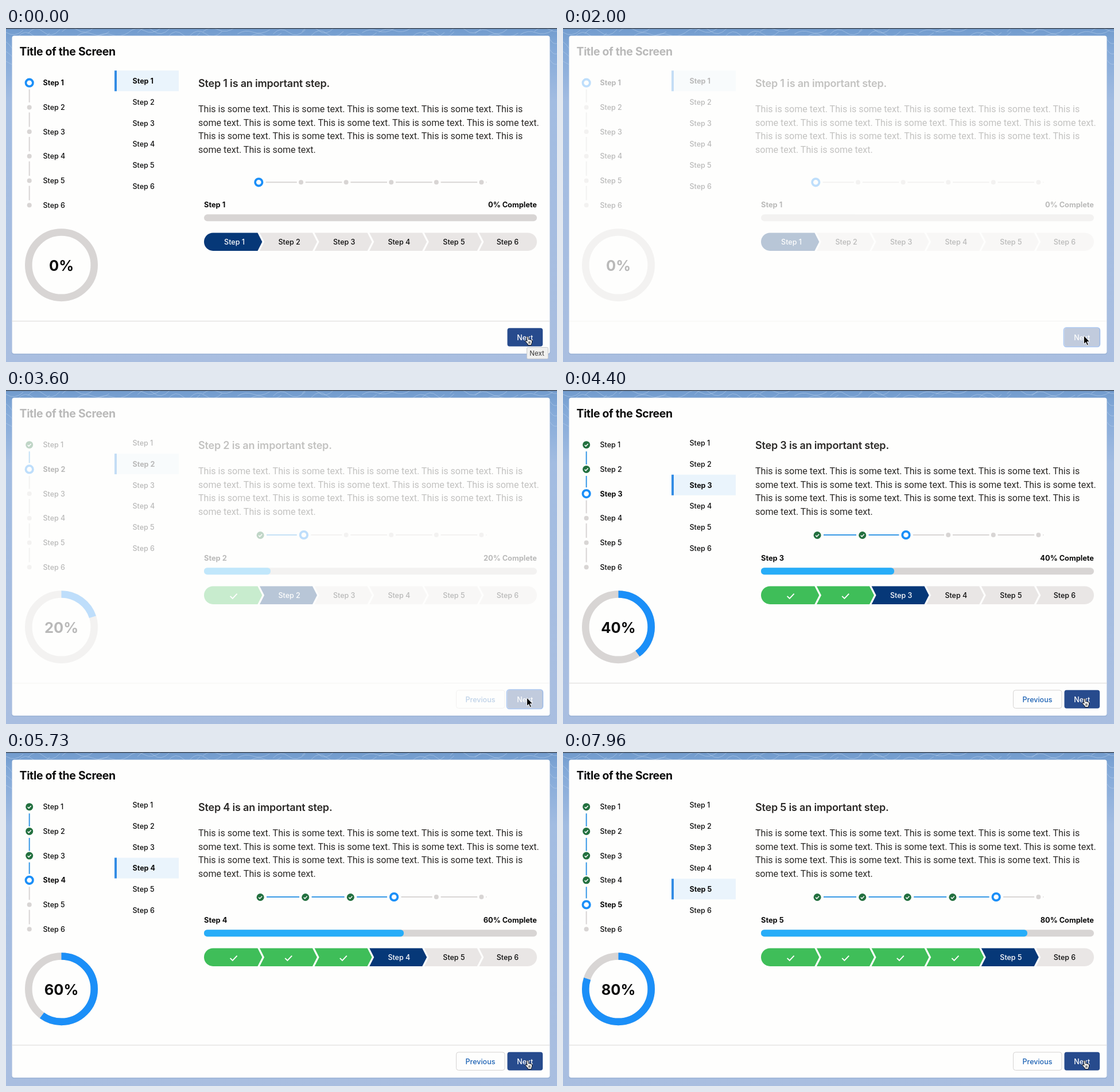
Animation of 960x583 px, one loop 8 s. Source, as an HTML page:

```html
<!DOCTYPE html>
<html lang="en">
<head>
<meta charset="utf-8">
<title>Step progress</title>
<style>
  html, body { margin: 0; width: 100%; height: 100%; overflow: hidden; background: #a8bee0; }
  svg { display: block; width: 960px; height: 583px; }
  text { font: 500 12.5px Inter, sans-serif; fill: #0c0c0c; }
  .bold { font-weight: 700; }
  .mid { text-anchor: middle; }
  .end { text-anchor: end; }
  .title { font-size: 19.4px; letter-spacing: -.3px; }
  .head { font-size: 18px; font-weight: 600; letter-spacing: -.19px; fill: #2b2927; }
  .body { font: 400 16.06px Roboto, sans-serif; fill: #2b2927; }
  .label { font-size: 12.8px; }
  .percent { font-size: 25.5px; }
  .white { fill: #fff; }
  .link { fill: #1c62b4; }
  .tip { font-size: 11.5px; font-weight: 400; fill: #333; }
</style>
</head>
<body>
<svg viewBox="0 0 960 583">
  <defs>
    <linearGradient id="sky" x1="0" y1="0" x2="0" y2="1">
      <stop offset="0" stop-color="#719bcd"/>
      <stop offset=".06" stop-color="#83a9d8"/>
      <stop offset=".22" stop-color="#a2bce1"/>
      <stop offset="1" stop-color="#a9bee0"/>
    </linearGradient>
  </defs>
  <rect width="960" height="583" fill="url(#sky)"/>
  <g id="swirls" fill="none" stroke="#b9d0ec" stroke-opacity=".55"/>
  <rect width="960" height="1.5" fill="#454d58"/>
  <rect x="10" y="14" width="938" height="556" rx="4" fill="#7f9cc5" opacity=".45"/>
  <rect x="10.5" y="13.5" width="937" height="555" rx="4" fill="#fefefd"/>
  <rect id="focus" x="872.5" y="523" width="63" height="33.5" rx="4.5" fill="none" stroke="#a9c6f2" stroke-width="1.5"/>
  <g id="screen"></g>
  <g id="tooltip">
    <rect x="907.5" y="557.5" width="37" height="20" rx="2" fill="#f0f0ef" stroke="#c6c9ce"/>
    <text class="tip mid" x="925" y="571.5">Next</text>
  </g>
  <path id="arrow" d="M907.5 537v14.6l3.3-3 2.3 5.2 2.3-1-2.3-5.1h4.5z" fill="#000" stroke="#fff" stroke-width=".9"/>
  <path id="hand" d="M907 539.2q1.5-1.5 2.7.3l1 4.6q1.3-1 2.1.2 1.5-.8 2.1.5 1.6-.4 1.7 1.3l-.2 3.3-1 2v2.2h-6.2v-1.8l-4.4-4.7q-.2-1.9 1.8-1.2l1.5 1.1z M911 547v4.2 M913 547v4.2" fill="#fff" stroke="#111" stroke-width="1"/>
</svg>
<script>
const LOOP = 8000;
const FADED = 0.28;
const COUNT = 6;
const BLUE = '#1b8ff8', LINE = '#3698e6', GREY = '#d8d5d4', GREEN = '#23703f';

// [start ms, step index, faded]
const TIMELINE = [
  [0, 0, false], [1600, 0, true],
  [2130, 1, false], [3600, 1, true],
  [4130, 2, false], [5200, 2, true],
  [5730, 3, false], [6860, 3, true],
  [7400, 4, false],
];

const $ = id => document.getElementById(id);
const each = (n, fn) => Array.from({ length: n }, (_, i) => fn(i)).join('');
const text = (x, y, str, cls = '') => `<text x="${x}" y="${y}" class="${cls}">${str}</text>`;
const rect = (x, y, w, h, fill, rx = 0, extra = '') =>
  `<rect x="${x}" y="${y}" width="${w}" height="${h}" rx="${rx}" fill="${fill}" ${extra}/>`;
const line = (x1, y1, x2, y2, color) =>
  `<path d="M${x1} ${y1}L${x2} ${y2}" stroke="${color}" stroke-width="2"/>`;
const tick = (x, y, s, w) =>
  `<path d="M${x - s} ${y + s * .1}l${s * .7} ${s * .7} ${s * 1.3} ${-s * 1.4}" fill="none" stroke="#fff" stroke-width="${w}"/>`;

function marker(x, y, i, step) {
  if (i < step) return `<circle cx="${x}" cy="${y}" r="6.5" fill="${GREEN}"/>` + tick(x, y, 3, 1.5);
  if (i === step) return `<circle cx="${x}" cy="${y}" r="6.2" fill="#fff" stroke="${BLUE}" stroke-width="3.8"/>`;
  return `<circle cx="${x}" cy="${y}" r="4" fill="${GREY}"/>`;
}

function verticalSteps(step) {
  const y = i => 95.7 + 42.7 * i;
  return each(COUNT - 1, i => {
    const top = y(i) + (i <= step ? 11.5 : 9);
    const bottom = y(i + 1) - (i + 1 === step ? 11 : 8.5);
    return line(40.7, top, 40.7, bottom, i < step ? LINE : GREY);
  }) + each(COUNT, i => marker(40.7, y(i), i, step)
    + text(64.5, y(i) + 4.4, `Step ${i + 1}`, i === step ? 'bold' : ''));
}

function navList(step) {
  const y = i => 92.3 + 36.75 * i;
  return rect(189, y(step) - 18, 112, 36, '#eaf4fc') + rect(189, y(step) - 18, 4, 36, '#338ce4')
    + each(COUNT, i => text(220.5, y(i) + 4.7, `Step ${i + 1}`, i === step ? 'bold' : ''));
}

function dotRow(step, y) {
  const base = i => 435.4 + 78.6 * i;
  const shift = i => i < step ? 7.7 : i === step ? 4.9 : 0;
  return each(COUNT - 1, i => {
    const from = base(i) + (i < step ? 18.6 : i === step ? 17.3 : 7.8);
    const to = base(i + 1) - (i + 1 < step ? 3 : 7.2);
    return line(from, y, to, y, i < step ? LINE : GREY);
  }) + line(836, y, 837.5, y, '#e4e2e1')
    + each(COUNT, i => marker(base(i) + shift(i), y + (i < step ? .5 : 0), i, step));
}

function chevrons(step, mid) {
  const top = mid - 15.7, bottom = mid + 15.7;
  return each(COUNT, i => {
    const x = 346.4 + 95.6 * i;
    const left = i ? `M${x + 8} ${mid}L${x} ${top}` : `M360.7 ${bottom}A15.7 15.7 0 0 1 360.7 ${top}`;
    const right = i < COUNT - 1
      ? `H${x + 92}L${x + 100} ${mid}L${x + 92} ${bottom}`
      : `H909.3A15.7 15.7 0 0 1 909.3 ${bottom}`;
    const fill = i < step ? '#3fbe59' : i === step ? '#063878' : '#e9e6e5';
    const cx = i < COUNT - 1 ? x + 51.6 : 874;
    return `<path d="${left}${right}${i ? `H${x}` : ''}Z" fill="${fill}"/>`
      + (i < step ? tick(x + 50.2, mid + 1, 6, 1.9)
        : text(cx, mid + 4.7, `Step ${i + 1}`, i === step ? 'mid white' : 'mid'));
  });
}

function ring(percent) {
  const r = 57.2, around = 2 * Math.PI * r;
  const circle = (color, extra = '') =>
    `<circle cx="96.5" cy="413.7" r="${r}" fill="none" stroke="${color}" stroke-width="12.6" ${extra}/>`;
  return circle(GREY)
    + (percent ? circle(BLUE, `stroke-dasharray="${around * percent / 100} ${around}" transform="rotate(-90 96.5 413.7)"`) : '')
    + text(96.5, 423.6, `${percent}%`, 'percent bold mid');
}

function progressBar(step, percent, y) {
  return text(345, y - 18.5, `Step ${step + 1}`, 'label bold')
    + text(925, y - 18.5, `${percent}% Complete`, 'label bold end')
    + rect(345, y - 6, 580, 12, GREY, 6)
    + (percent ? rect(345, y - 6, 5.8 * percent, 12, '#27adf8', 5.5) : '');
}

function paragraph() {
  const s = 'This is some text.';
  const tail = 'some text.';
  const lines = [
    `${s} ${s} ${s} ${s} This is`,
    `${tail} ${s} ${s} ${s} ${s}`,
    `${s} ${s} ${s} ${s} This is`,
    `${tail} ${s}`,
  ];
  return lines.map((str, i) => text(335, 146.6 + 23.9 * i, str, 'body')).join('');
}

function screen(step) {
  const percent = step * 20;
  const lift = step ? 15 : 0;
  return text(23.5, 48, 'Title of the Screen', 'title bold')
    + verticalSteps(step) + navList(step) + ring(percent)
    + text(335, 103, `Step ${step + 1} is an important step.`, 'head') + paragraph()
    + dotRow(step, step ? 253 : 269.3)
    + progressBar(step, percent, 331.2 - lift)
    + chevrons(step, 373.2 - lift)
    + rect(10.5, 511, 937, 1.3, '#e1e0df')
    + (step ? rect(784.5, 524, 84.5, 31.5, '#fefefd', 4, 'stroke="#d5d3d2"') + text(826.5, 544.5, 'Previous', 'mid link') : '')
    + rect(873.5, 523.7, 61.7, 32, '#274b8d', 4) + text(904.3, 544.5, 'Next', 'mid white');
}

// Soft contour lines along the top edge and sides
$('swirls').innerHTML = each(26, i => {
  const x = i * 38 + 12 * Math.sin(i * 2.4), y = 6 + 5 * Math.sin(i * 1.7);
  return `<path d="M${x - 26} ${y + 5}q13 ${-12 - 4 * Math.sin(i)} 27-3t29-4"/>`;
}) + each(3, i => `<path d="M0 ${24 + i * 17}q5 3 11 ${12 - i * 3}M948 ${20 + i * 18}q5 9 12 7"/>`);

const show = (el, on) => el.setAttribute('opacity', on);
const start = performance.now();
let shown = -1;

function draw() {
  const t = (performance.now() - start) % LOOP;
  const [, step, faded] = TIMELINE.findLast(row => row[0] <= t);
  if (step !== shown) {
    $('screen').innerHTML = screen(step);
    shown = step;
  }
  show($('screen'), faded ? FADED : 1);
  show($('focus'), faded ? 1 : 0);
  show($('arrow'), faded ? 1 : 0);
  show($('hand'), faded ? 0 : 1);
  show($('tooltip'), Math.min(1, Math.max(0, (200 - t) / 170)));
  requestAnimationFrame(draw);
}
draw();
</script>
</body>
</html>
```
